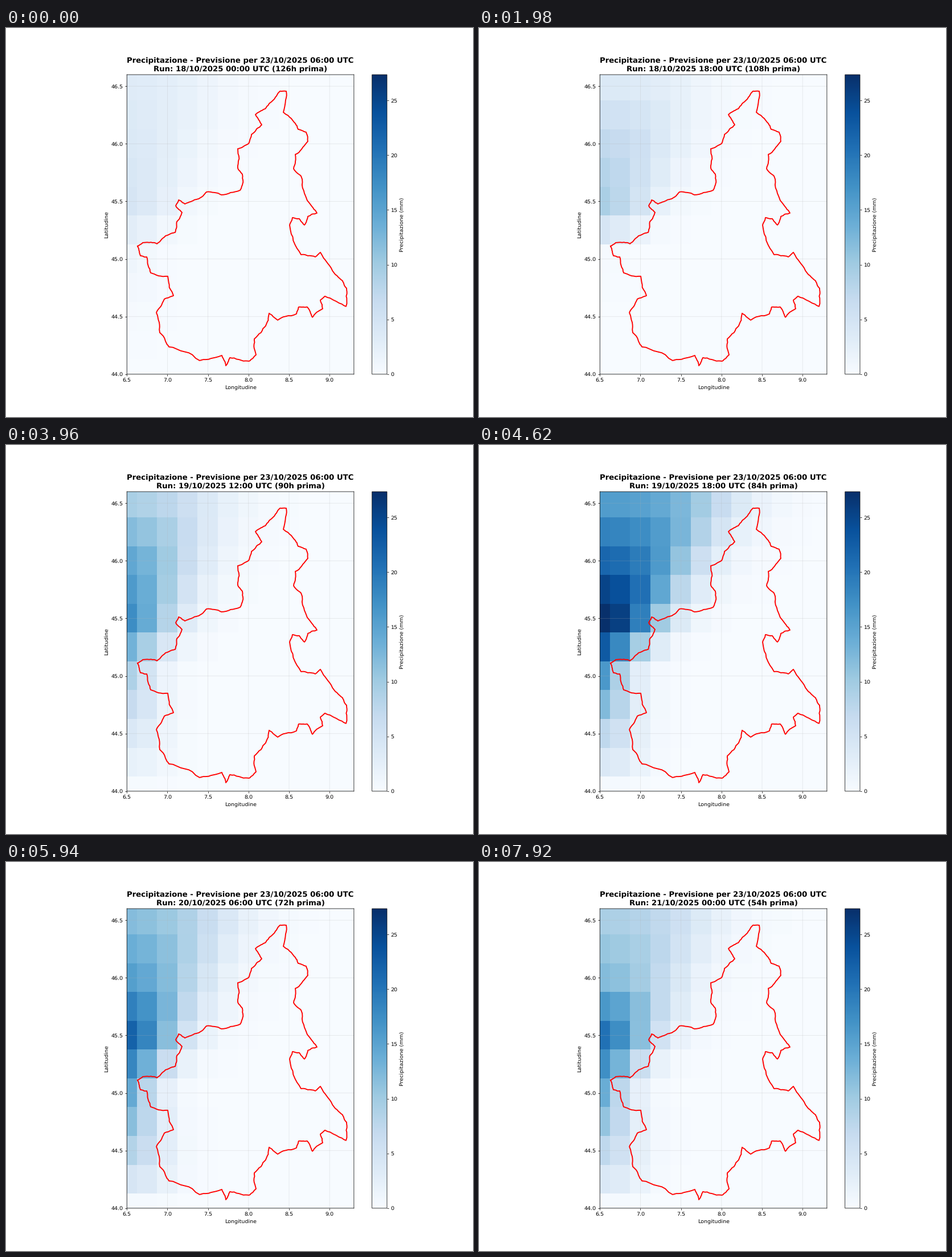
These frames come from a looping animation (820 px wide and 683 px high, 8000 ms). A matplotlib script:

```python
import math

import numpy as np
import matplotlib.pyplot as plt
from matplotlib.animation import FuncAnimation

WIDTH, HEIGHT = 820, 683
DPI = WIDTH / 12
LOOP_MS, STEP_MS, INTERVAL = 8000, 660, 40
LONS = np.arange(6.5, 9.3, 0.25)
LATS = np.arange(46.5, 43.9, -0.25)
MAX_RAIN = 27.35

plt.rcParams.update({"font.family": "DejaVu Sans", "text.hinting": "none",
                     "path.snap": False})

# Key states of the rain band: how far it reaches east (degrees of longitude
# per degree north), then its strength in mm every half degree from 44 to 46.5
BAND = {
    0: (0.45, 0, 0.4, 1.5, 5.2, 4.2, 3.5),
    3: (0.55, 0, 0, 0.5, 10, 7.6, 4),
    5: (0.10, 0, 0.7, 2, 9, 9, 3.6),
    7: (0.78, 0.5, 8, 20, 30, 22, 16),
    8: (0.58, 1, 15, 24, 29, 18, 15),
    10: (0.50, 0, 3.5, 11, 19, 14.5, 9.5),
    12: (0.60, 0.5, 8, 17, 22, 12.5, 9.5),
}


def rain(run):
    """Rain in mm on the grid: a band along the west that fades eastwards."""
    reach, *strength = (np.interp(run, list(BAND), column)
                        for column in zip(*BAND.values()))
    north = np.maximum(LATS - 45, 0)
    south = np.maximum(45 - LATS, 0)
    edge = 6.72 + reach * north + 0.3 * south
    softness = 0.15 + 0.1 * north
    west = np.interp(LATS, np.linspace(44, 46.5, 6), strength)
    fade = 1 + np.exp((LONS - edge[:, None]) / softness[:, None])
    return west[:, None] / fade


# Corners of the region in stage pixels, clockwise from the western tip
CORNERS = [
    (231, 383), (240, 377), (265, 379), (280, 365), (297, 359), (300, 340),
    (309, 324), (298, 312), (303, 302), (314, 309), (338, 300), (352, 288),
    (378, 293), (411, 285), (416, 272), (415, 257), (407, 246), (407, 212),
    (426, 203), (431, 187), (449, 170), (438, 152), (455, 142), (470, 126),
    (481, 111), (492, 111), (487, 148), (501, 159), (513, 178), (527, 183),
    (530, 199), (508, 222), (505, 247), (518, 260), (529, 303), (546, 325),
    (530, 331), (524, 346), (515, 335), (503, 333), (498, 346), (518, 398),
    (543, 402), (552, 394), (576, 430), (591, 444), (598, 457), (597, 489),
    (560, 471), (552, 478), (556, 493), (538, 508), (529, 490), (514, 490),
    (510, 502), (477, 513), (462, 501), (456, 523), (436, 546), (439, 574),
    (427, 585), (393, 579), (386, 593), (379, 575), (340, 584), (286, 560),
    (270, 535), (264, 500), (278, 476), (294, 470), (284, 436), (254, 430),
    (247, 402), (236, 400)]


def roughen(points, levels=3, size=0.08):
    """Split each segment repeatedly, shifting midpoints like a coastline."""
    rng = np.random.default_rng(4)
    for _ in range(levels):
        steps = np.diff(points, axis=0)
        shift = size * np.hypot(*steps.T)[:, None]
        mids = points[:-1] + steps / 2 + rng.uniform(-1, 1, steps.shape) * shift
        points = np.insert(points, range(1, len(points)), mids, axis=0)
    return points


fig, ax = plt.subplots(figsize=(12, (HEIGHT + 0.005) / DPI), dpi=DPI)
mesh = ax.pcolormesh(LONS, LATS, rain(0), cmap="Blues", vmin=0, vmax=MAX_RAIN,
                     shading="nearest")
fig.colorbar(mesh, ax=ax, label="Precipitazione (mm)")

border = roughen(np.array(CORNERS + CORNERS[:1], float))
ax.plot(6.5 + (border[:, 0] - 212.2) / 142.4,
        46.6 - (border[:, 1] - 82) / 202.3,
        color="red", lw=2, solid_joinstyle="round")
ax.set(xlim=(6.5, 9.3), ylim=(44, 46.6), xlabel="Longitudine",
       ylabel="Latitudine", aspect=1 / math.cos(math.radians(45.262)))
ax.grid(alpha=0.3)
title = ax.set_title("", fontsize=14, fontweight="bold")


def draw(frame):
    run = int((frame + 0.5) * INTERVAL // STEP_MS)
    day, quarter = divmod(run, 4)
    mesh.set_array(rain(run))
    title.set_text(
        "Precipitazione - Previsione per 23/10/2025 06:00 UTC\n"
        f"Run: {18 + day}/10/2025 {6 * quarter:02d}:00 UTC ({126 - 6 * run}h prima)")
    return mesh, title


animation = FuncAnimation(fig, draw, frames=LOOP_MS // INTERVAL,
                          interval=INTERVAL, repeat=True, repeat_delay=0)
plt.show()
```
